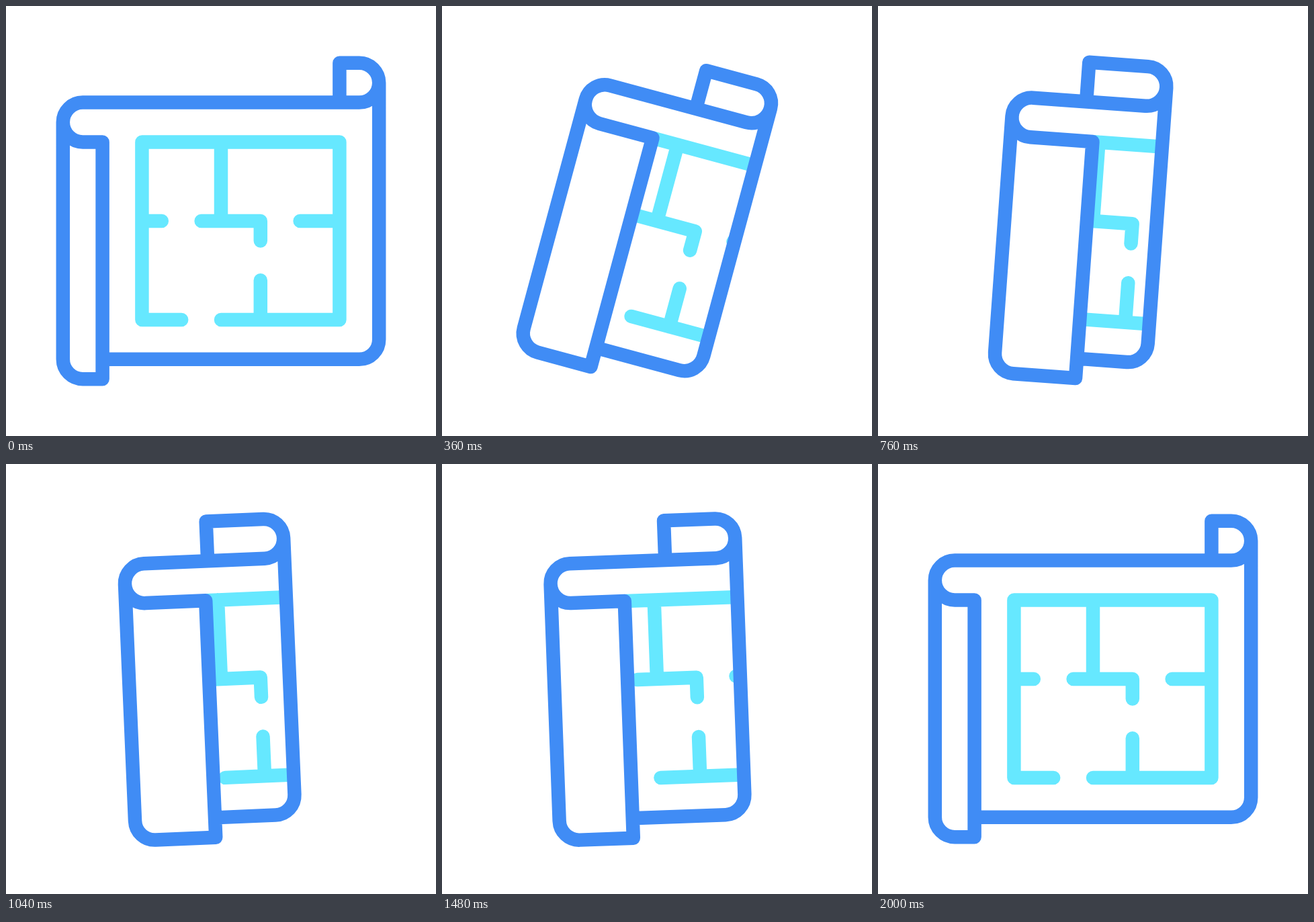
Animation of 640 by 640 pixels, one loop 2.38 s. Source, as an HTML page with a canvas:

```html
<!DOCTYPE html>
<html lang="en">
<head>
<meta charset="utf-8">
<title>Floor plan</title>
<style>
html, body { margin: 0; width: 100%; height: 100%; overflow: hidden; background: #fff; }
canvas { display: block; width: 100vmin; height: 100vmin; }
</style>
</head>
<body>
<canvas id="stage" width="640" height="640"></canvas>
<script>
const ctx = document.getElementById('stage').getContext('2d');
const LOOP = 2380;
const U = 29.4; // grid unit; all shapes are in units from the centre
const BLUE = '#408cf5', CYAN = '#66e8ff';

const WALLS = new Path2D(
  'M-2 5H-4V-4H6V5H0 M-4 0H-3 M0-4V0 M-1 0H2V1 M4 0H6 M2 3V5');

const clamp = u => Math.min(1, Math.max(0, u));
const ease = u => u * u * (3 - 2 * u);

// Rolls up, slackens slowly, then springs open
function rollAt(t) {
  const rise = ease(clamp(t / 500));
  const slack = 3.9e-5 * Math.max(0, t - 500) ** 2;
  const open = clamp((t - 1570) / 430);
  return (170 * rise - slack) * (1 - open ** 2) ** 3.9 / U;
}

// Swings to and fro, each peak about half the last, in degrees
function tiltAt(t) {
  const peak = k => k < 0 || k > 3 ? 0 : 22.5 * (-0.53) ** k;
  const time = k => k < 0 ? 0 : k < 1 ? 585 : 922 + 232 * (k - 1);
  let k = 0;
  while (k < 4 && t > time(k)) k++;
  const u = clamp((t - time(k - 1)) / (time(k) - time(k - 1)));
  return peak(k - 1) + (peak(k) - peak(k - 1)) * ease(u);
}

function paper(outL, inL, inR, outR) {
  const l = outL + 1, r = outR - 1;
  return new Path2D(`
    M${l} -6 A1 1 0 0 0 ${outL} -5 V7 A1 1 0 0 0 ${l} 8
    H${inL} V-4 H${l} A1 1 0 0 1 ${outL} -5
    M${l} -6 H${r} A1 1 0 0 0 ${r} -8 H${inR} V-6
    M${outR} -7 V6 A1 1 0 0 1 ${r} 7 H${inL}`);
}

function draw(t) {
  const roll = rollAt(t);
  const outL = -8 + 0.62 * roll, inL = -6 + roll;
  const inR = 6 - 1.19 * roll, outR = 8 - 0.84 * roll;

  ctx.fillStyle = '#fff';
  ctx.fillRect(0, 0, 640, 640);
  ctx.save();
  ctx.translate(320, 320);
  ctx.rotate(tiltAt(t) * Math.PI / 180);
  ctx.scale(U, U);
  ctx.lineWidth = 20.5 / U;
  ctx.lineCap = ctx.lineJoin = 'round';

  // only the open part of the sheet shows the plan
  ctx.save();
  ctx.beginPath();
  ctx.rect(inL, -8, outR - inL, 16);
  ctx.clip();
  ctx.strokeStyle = CYAN;
  ctx.stroke(WALLS);
  ctx.restore();

  ctx.strokeStyle = BLUE;
  ctx.stroke(paper(outL, inL, inR, outR));
  ctx.restore();
}

const start = performance.now();
function tick() {
  draw((performance.now() - start) % LOOP);
  requestAnimationFrame(tick);
}
tick();
</script>
</body>
</html>
```
